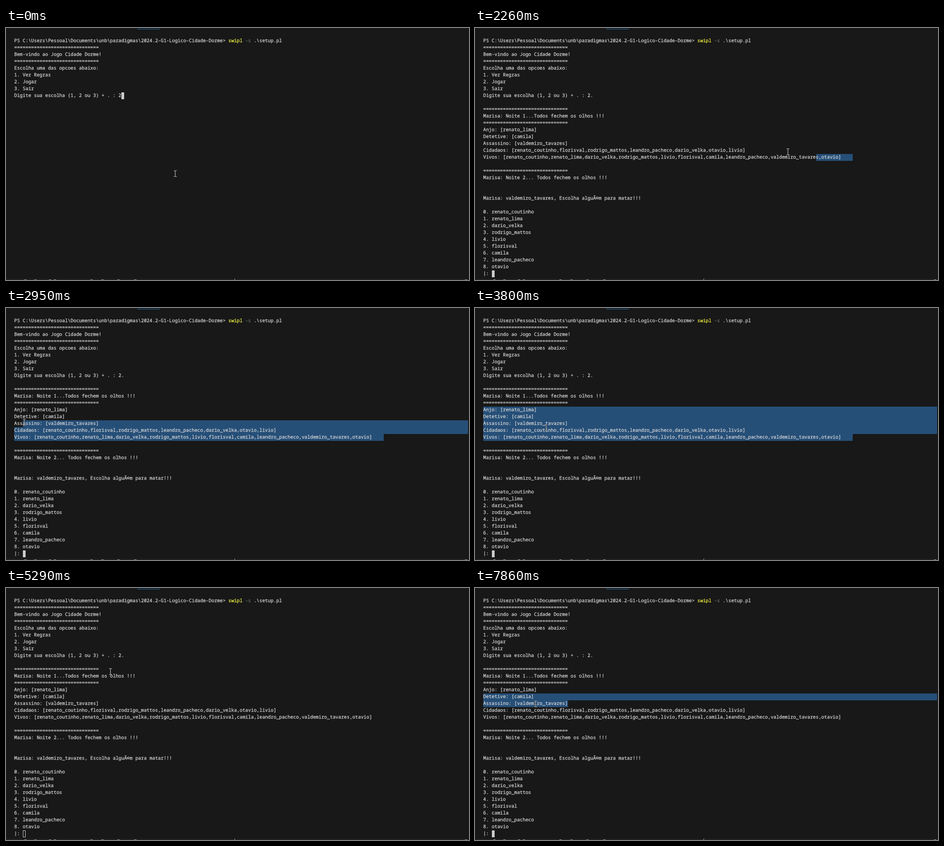
An HTML page that plays this animation: 1015 px wide and 552 px high, repeating every 8000 ms.

```html
<!DOCTYPE html>
<html lang="pt">
<head>
<meta charset="utf-8">
<title>Terminal</title>
<style>
  html, body { margin: 0; width: 100%; height: 100%; overflow: hidden; background: #181818; }
  #stage { position: relative; width: 1015px; height: 552px; overflow: hidden; isolation: isolate; background: #181818; }
  #stage > * { position: absolute; }
  pre {
    left: 18px; top: 20.5px; margin: 0; color: #d6d6d6;
    font: 10.31px/15px "Noto Sans Mono", "DejaVu Sans Mono", monospace;
    font-variant-ligatures: none; text-rendering: geometricPrecision;
    -webkit-text-stroke: .25px;
  }
  .cmd { color: #f5f543; }
  .opt { color: #6c6c6c; }
  .sel { height: 15px; background: #264f78; }
  .caret { position: absolute; width: 6.2px; height: 15px; box-sizing: border-box; border: 1px solid #ccc; background: #ccc; }
  .caret.hollow { background: none; }
  #tab { left: 288px; top: 2px; width: 49px; height: 1px; background: #1a6ca6; }
  #edge { left: 0; top: 550px; width: 1015px; height: 1px; background: #2b2b2b; }
  .mark { bottom: 0; width: 5px; height: 1.5px; background: #aaa; }
  #mouse { left: -4px; top: -7px; mix-blend-mode: difference; }
</style>
</head>
<body>
<div id="stage">
<div id="tab"></div>
<div id="edge"></div>
<pre id="text">
PS C:\Users\Pessoal\Documents\unb\paradigmas\2024.2-G1-Logico-Cidade-Dorme&gt; <span class="cmd">swipl</span> <span class="opt">-s</span> .\setup.pl
==============================
Bem-vindo ao Jogo Cidade Dorme!
==============================
Escolha uma das opcoes abaixo:
1. Ver Regras
2. Jogar
3. Sair
Digite sua escolha (1, 2 ou 3) + . : 2<span id="dot">.</span><span id="ask" class="caret"></span>
<span id="output">
==============================
Marisa: Noite 1...Todos fechem os olhos !!!
==============================
Anjo: [renato_lima]
Detetive: [camila]
Assassino: [valdemiro_tavares]
Cidadaos: [renato_coutinho,florisval,rodrigo_mattos,leandro_pacheco,dario_velka,otavio,livio]
Vivos: [renato_coutinho,renato_lima,dario_velka,rodrigo_mattos,livio,florisval,camila,leandro_pacheco,valdemiro_tavares,otavio]

==============================
Marisa: Noite 2... Todos fechem os olhos !!!


Marisa: valdemiro_tavares, Escolha alguÃ©m para matar!!!

0. renato_coutinho
1. renato_lima
2. dario_velka
3. rodrigo_mattos
4. livio
5. florisval
6. camila
7. leandro_pacheco
8. otavio
|: <span id="kill" class="caret"></span></span></pre>
<svg id="mouse" width="8" height="14" viewBox="0 0 8 14" fill="none" stroke="#fff">
  <path d="M1 .5H3.5M4.5 .5H7M4 1V13M1 13.5H3.5M4.5 13.5H7"/>
</svg>
</div>
<script>
const LOOP = 8000, STEP = LOOP / 60, LEAD = 50;
const X0 = 18, Y0 = 20.5, CELL = 6.186, ROW = 15, RIGHT = 1013;
const LAG = 0.75; // the selection trails the pointer, in steps
const $ = id => document.getElementById(id);
const stage = $('stage'), mouse = $('mouse');

// turning points of the pointer: step, x, y
const path = [
  [11, 371, 319], [14, 821, 290], [15, 833, 286], [16, 767, 283], [17, 686, 271],
  [18, 310, 234], [20, 60, 222], [21, 34, 244.5], [22, 40, 250], [23, 17, 222],
  [25, 14, 225], [27, 199, 320], [28, 156, 262], [29, 150, 270], [30, 368, 870],
  [37, 368, 527], [39, 255, 163], [40, 229, 183], [42, 89, 255], [44, 68, 252],
  [47, 68, 252], [50, 199, 251], [51, 199, 251], [54, 8, 238], [56, 84, 245],
  [57, 84, 245], [59, 133, 254]
];
// each drag starts at a cell, follows the pointer to step `to` and stays until `end`
const drags = [
  { from: 16, to: 24, end: 29, row: 17, col: 131 },
  { from: 46, to: 46, end: 52, row: 15, col: 0 },
  { from: 52, to: 55, end: 60, row: 15, col: 30 }
];

function add(name) {
  const el = document.createElement('div');
  el.className = name;
  return stage.insertBefore(el, $('text'));
}
const bars = Array.from({ length: 5 }, () => add('sel'));
for (const x of [40, 62, 94, 105, 185, 209, 244, 281, 1006]) add('mark').style.left = x + 'px';
Object.assign(add('mark').style, { left: '501px', width: '1px', height: '3px' });

function pointer(k) {
  const i = path.findIndex(p => p[0] > k);
  if (i < 1) return path.at(i).slice(1);
  const [k0, x0, y0] = path[i - 1], [k1, x1, y1] = path[i];
  const p = (k - k0) / (k1 - k0);
  return [x0 + (x1 - x0) * p, y0 + (y1 - y0) * p];
}

function drawSelection(k) {
  bars.forEach(bar => { bar.style.display = 'none'; });
  const drag = drags.find(d => k >= d.from && k < d.end);
  if (!drag) return;
  const [x, y] = pointer(Math.min(k, drag.to) - LAG);
  const head = { row: Math.floor((y - Y0) / ROW), col: Math.max(0, Math.ceil((x - X0) / CELL)) };
  const [a, b] = [head, drag].sort((p, q) => p.row - q.row || p.col - q.col);
  for (let r = a.row; r <= b.row; r++) {
    const left = r === a.row ? X0 + a.col * CELL : X0;
    const right = r === b.row ? X0 + b.col * CELL : RIGHT;
    Object.assign(bars[r - a.row].style, {
      display: 'block', left: left + 'px', width: right - left + 'px', top: Y0 + r * ROW + 'px'
    });
  }
}

const show = (id, on) => { $(id).style.display = on ? '' : 'none'; };

function draw(t) {
  const k = Math.floor((t + LEAD) / STEP);
  show('dot', t >= 530);
  show('ask', t < 1090);
  show('output', t >= 1090);
  $('kill').classList.toggle('hollow', t >= 4530 && t < 6110);
  drawSelection(k);
  const [x, y] = pointer(k).map(Math.round);
  mouse.style.transform = `translate(${x}px, ${y}px)`;
}

const start = performance.now();
function tick() {
  draw((performance.now() - start) % LOOP);
  requestAnimationFrame(tick);
}
tick();
</script>
</body>
</html>
```
